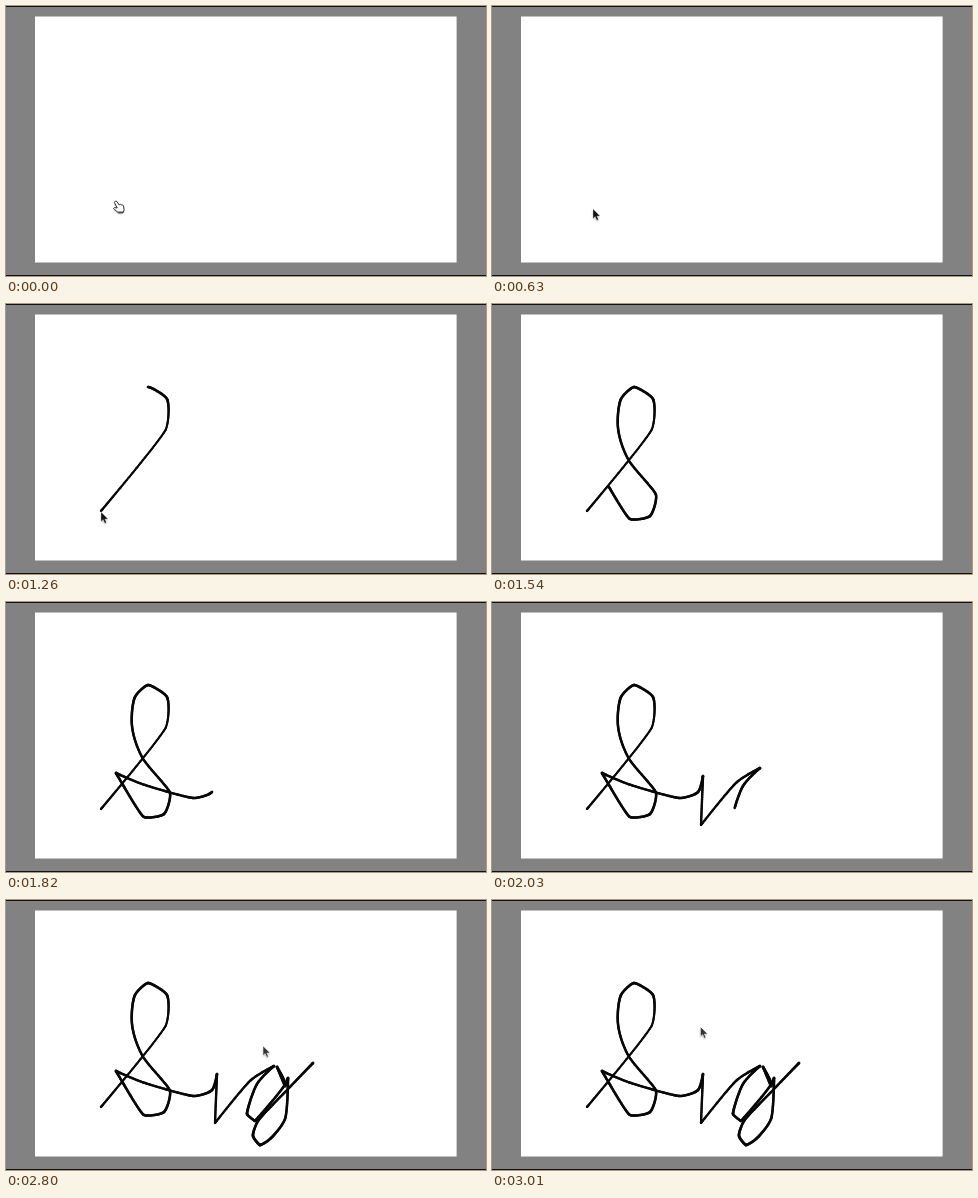
Write an HTML page with a canvas that moves like this. It is 480 px wide and 270 px high and loops after 3.85 s.

```html
<!DOCTYPE html>
<html lang="en">
<head>
<meta charset="utf-8">
<title>Handwriting</title>
<style>
  html, body { margin: 0; width: 100%; height: 100%; overflow: hidden; background: #828282; }
  canvas { display: block; width: 480px; height: 270px; }
</style>
</head>
<body>
<canvas id="stage" width="480" height="270"></canvas>
<script>
const ctx = document.getElementById('stage').getContext('2d');
const LOOP = 3850, STEP = 70, PEN_DOWN = 840;

// Turning points of the pen; each leg is written at an even speed up to its end time.
const legs = [
  { end: 1260, points: [[95, 207], [160, 125], [161, 95], [142, 83]] },
  { end: 1400, points: [[129, 95], [126, 124], [136, 155], [164, 191], [158, 212]] },
  { end: 1540, points: [[138, 215], [117, 183]] },
  { end: 1820, points: [[110, 171], [136, 182], [188, 196], [206, 190]] },
  { end: 1960, points: [[211, 174], [209, 223], [245, 180], [268, 166]] },
  { end: 2310, points: [[251, 184], [241, 214], [249, 221], [279, 184], [271, 167],
                        [279, 186], [282, 178], [279, 219], [264, 239]] },
  { end: 2450, points: [[254, 245], [247, 236], [252, 221], [282, 189], [307, 163]] }
];

const points = legs.flatMap(leg => leg.points);
const clamp = (v, lo, hi) => Math.min(hi, Math.max(lo, v));
const at = i => points[clamp(i, 0, points.length - 1)];
const lerp = (a, b, u) => a + (b - a) * u;
const mix = (p, q, u) => p.map((v, n) => lerp(v, q[n], u));
const span = i => Math.hypot(at(i + 1)[0] - at(i)[0], at(i + 1)[1] - at(i)[1]);

// Fast spans leave thinner ink.
const widthAt = i => clamp(2.95 - (span(i - 1) + span(i)) / 140, 1.9, 2.8);

// Handle along the mean direction, shrinking to nothing where the pen turns back.
function handle(i, sign) {
  const a = span(i - 1), b = span(i);
  if (!a || !b) return at(i);
  const [p, q, r] = [at(i - 1), at(i), at(i + 1)];
  const before = [0, 1].map(n => (q[n] - p[n]) / a);
  const after = [0, 1].map(n => (r[n] - q[n]) / b);
  const straight = Math.max(0, before[0] * after[0] + before[1] * after[1]);
  const reach = sign * 0.18 * Math.min(a, b) * Math.sqrt(straight);
  return q.map((v, n) => v + (before[n] + after[n]) * reach);
}

function bezier(a, b, c, d, u) {
  const ab = mix(a, b, u), bc = mix(b, c, u), cd = mix(c, d, u);
  return mix(mix(ab, bc, u), mix(bc, cd, u), u);
}

const ink = [{ pos: at(0), width: widthAt(0) }];
const progress = [[PEN_DOWN, 0]];
let next = 1;
for (const { end, points: leg } of legs) {
  for (const point of leg) {
    if (point === at(0)) continue;
    const i = next++ - 1, count = Math.ceil(span(i) / 1.5);
    for (let k = 1; k <= count; k++) {
      ink.push({
        pos: bezier(at(i), handle(i, 1), handle(i + 1, -1), at(i + 1), k / count),
        width: lerp(widthAt(i), widthAt(i + 1), k / count)
      });
    }
  }
  progress.push([end, ink.length - 1]);
}

// Linear motion through [time, ...values] keys.
function tween(keys, t) {
  const i = keys.findIndex(key => t < key[0]);
  if (i < 0) return keys[keys.length - 1].slice(1);
  if (i === 0) return keys[0].slice(1);
  const [a, b] = [keys[i - 1], keys[i]];
  return mix(a, b, (t - a[0]) / (b[0] - a[0])).slice(1);
}

function drawInk(t) {
  const end = Math.round(tween(progress, t)[0]);
  ctx.strokeStyle = '#080808';
  ctx.lineCap = 'round';
  for (let i = 1; i <= end; i++) {
    ctx.lineWidth = ink[i].width;
    ctx.beginPath();
    ctx.moveTo(...ink[i - 1].pos);
    ctx.lineTo(...ink[i].pos);
    ctx.stroke();
  }
}

const arrow = new Path2D('M0 0V9.6L2.2 7.5L3.8 11.2L5.4 10.5L3.9 7H7Z');
const hand = new Path2D('M0 1.6Q.6 -.3 2.4 1L4.6 4.4Q6 3.2 7 4.4Q8.6 4 9 5.4L9.6 9.4L8.4 12.3H4L-1 8Q-1 6.4 2.4 7.4ZM4 11.6H8.5');

function drawCursor(shape, [x, y], fill, outline) {
  ctx.save();
  ctx.translate(x, y);
  ctx.lineWidth = 1;
  ctx.strokeStyle = outline;
  ctx.fillStyle = fill;
  ctx.shadowColor = 'rgba(0,0,0,.35)';
  ctx.shadowBlur = 2;
  ctx.shadowOffsetY = 1;
  ctx.fill(shape);
  ctx.shadowColor = 'transparent';
  ctx.stroke(shape);
  ctx.restore();
}

function box(color, x, y, w, h) {
  ctx.fillStyle = color;
  ctx.fillRect(x, y, w, h);
}

function render(now) {
  const t = Math.floor(now % LOOP / STEP) * STEP;
  box('#111', 0, 0, 480, 270);
  box('#828282', 0, 1, 480, 268);
  box('#fff', 29, 10.5, 421.6, 246);
  drawInk(t);
  if (t < 490) {
    drawCursor(hand, tween([[350, 108.5, 194.5], [420, 107.5, 195.5]], t), '#fff', '#333');
  } else if (t < 1470) {
    drawCursor(arrow, tween([[490, 105, 198], [630, 101, 203], [770, 95, 208]], t), '#111', 'rgba(255,255,255,.3)');
  } else if (t >= 2800) {
    drawCursor(arrow, tween([[2800, 257, 146], [3010, 208.5, 127]], t), '#333', 'rgba(255,255,255,.5)');
  }
}

function loop() {
  render(performance.now());
  requestAnimationFrame(loop);
}
loop();
</script>
</body>
</html>
```
